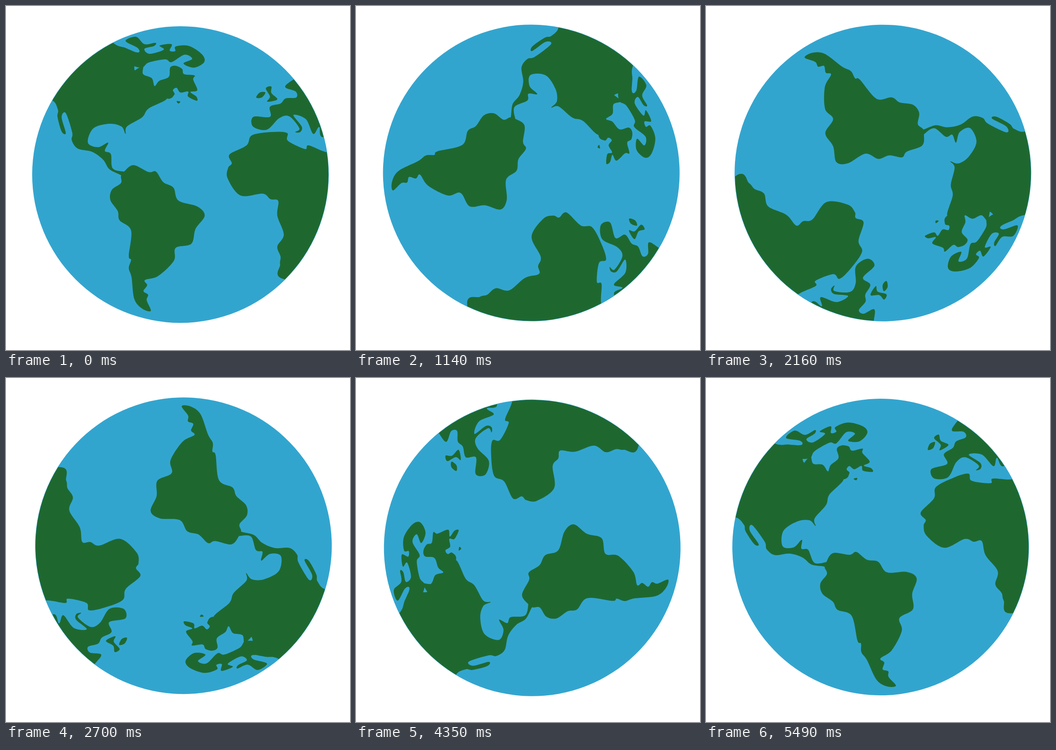
Write an HTML page with a canvas that moves like this. It is 748x748 px and loops after 5.55 s.

```html
<!DOCTYPE html>
<html lang="en">
<head>
<meta charset="utf-8">
<title>Turning globe</title>
<style>
  html, body { margin: 0; width: 100%; height: 100%; overflow: hidden; background: #fff; }
  canvas { display: block; width: 748px; height: 748px; }
</style>
</head>
<body>
<canvas id="stage" width="748" height="748"></canvas>
<script>
const ctx = document.getElementById('stage').getContext('2d');

const LOOP = 5550, STEP = 60, SHORT_END = 2850;
const TURN = Math.PI * 2 / 97;
const PIVOT = { x: 382.75, y: 366 };
const DISC = { x: 379.4, y: 366.5, r: 322.5 };
const SEA = '#32a5cf', LAND = '#1e6830';

// Smooth closed curve through a few coast points.
function coast(...xy) {
  const path = new Path2D(), n = xy.length / 2;
  const at = i => { const k = (i + n) % n * 2; return [xy[k], xy[k + 1]]; };
  path.moveTo(...at(0));
  for (let i = 0; i < n; i++) {
    const [a, b, c, d] = [at(i - 1), at(i), at(i + 1), at(i + 2)];
    path.bezierCurveTo(
      b[0] + (c[0] - a[0]) / 6, b[1] + (c[1] - a[1]) / 6,
      c[0] - (d[0] - b[0]) / 6, c[1] - (d[1] - b[1]) / 6,
      c[0], c[1]);
  }
  path.closePath();
  return path;
}

const northWest = coast(
  60, 205, 100, 205, 113, 226, 112, 241, 121, 273, 130, 276, 121, 242, 130, 233, 144, 275,
  143, 292, 156, 310, 187, 317, 211, 334, 225, 355, 250, 368, 258, 378, 268, 358, 257, 360,
  232, 353, 228, 322, 215, 315, 222, 297, 200, 307, 178, 297, 190, 266, 225, 256, 251, 262,
  260, 278, 263, 262, 296, 242, 310, 223, 350, 201, 320, 185, 280, 140, 288, 108, 262, 92,
  233, 80, 190, 30);

const peninsula = coast(
  345, 200, 366, 193, 363, 183, 371, 178, 379, 188, 396, 186, 396, 197, 415, 206, 414, 197,
  401, 187, 416, 183, 407, 160, 410, 151, 387, 148, 383, 137, 369, 130, 357, 134, 354, 154,
  333, 163, 323, 174, 317, 157, 298, 148, 297, 130, 270, 160);

const arctic = coast(
  262, 98, 288, 101, 286, 91, 260, 76, 283, 67, 301, 83, 325, 80, 322, 87, 301, 93, 312, 104,
  343, 95, 334, 86, 360, 83, 356, 97, 368, 98, 369, 88, 398, 87, 426, 105, 431, 122, 409, 134,
  386, 125, 405, 115, 388, 106, 360, 122, 346, 116, 310, 123, 295, 134, 270, 125);

const southWest = coast(
  250, 370, 250, 385, 230, 400, 227, 422, 243, 446, 247, 466, 272, 488, 267, 543, 272, 552,
  267, 570, 273, 590, 279, 637, 296, 658, 315, 663, 306, 640, 309, 628, 299, 620, 307, 607,
  302, 596, 331, 587, 365, 554, 369, 526, 403, 517, 412, 485, 432, 456, 416, 436, 375, 423,
  364, 395, 342, 383, 326, 360, 310, 361, 277, 346, 257, 360);

const southEast = coast(
  740, 318, 698, 318, 658, 303, 650, 311, 613, 293, 611, 276, 578, 274, 535, 281, 523, 303,
  486, 323, 491, 342, 483, 352, 482, 375, 510, 412, 558, 408, 575, 420, 592, 424, 590, 456,
  604, 497, 590, 523, 597, 545, 596, 562, 605, 594, 760, 600);

const northEast = coast(
  537, 262, 538, 241, 574, 241, 574, 219, 597, 212, 608, 201, 631, 199, 630, 186, 607, 176,
  626, 159, 670, 130, 760, 250, 691, 285, 681, 263, 668, 278, 652, 246, 625, 237, 643, 262,
  640, 274, 629, 274, 638, 266, 616, 240, 594, 244, 567, 269);

const bigIsle = coast(565, 179, 577, 175, 577, 189, 590, 203, 568, 208, 574, 197);
const smallIsle = coast(544, 199, 552, 188, 564, 188, 556, 199);
const islet = coast(371, 207, 379, 208, 375, 212);

const lands = [northWest, peninsula, arctic, southWest, southEast, northEast,
  bigIsle, smallIsle, islet];

function disc(r) {
  ctx.beginPath();
  ctx.arc(DISC.x, DISC.y, r, 0, Math.PI * 2);
}

function draw(ms) {
  const t = ms % LOOP;
  // One step is half as long as the others.
  const step = Math.floor((t + (t >= SHORT_END ? STEP / 2 : 0)) / STEP);
  ctx.fillStyle = '#fff';
  ctx.fillRect(0, 0, 748, 748);
  ctx.save();
  ctx.translate(PIVOT.x, PIVOT.y);
  ctx.rotate(step * TURN);
  ctx.translate(-PIVOT.x, -PIVOT.y);
  ctx.fillStyle = SEA;
  disc(DISC.r);
  ctx.fill();
  disc(DISC.r - 0.8);
  ctx.clip();
  ctx.fillStyle = LAND;
  lands.forEach(path => ctx.fill(path));
  ctx.restore();
}

const start = performance.now();
function tick() {
  draw(performance.now() - start);
  requestAnimationFrame(tick);
}
draw(0);
requestAnimationFrame(tick);
</script>
</body>
</html>
```
